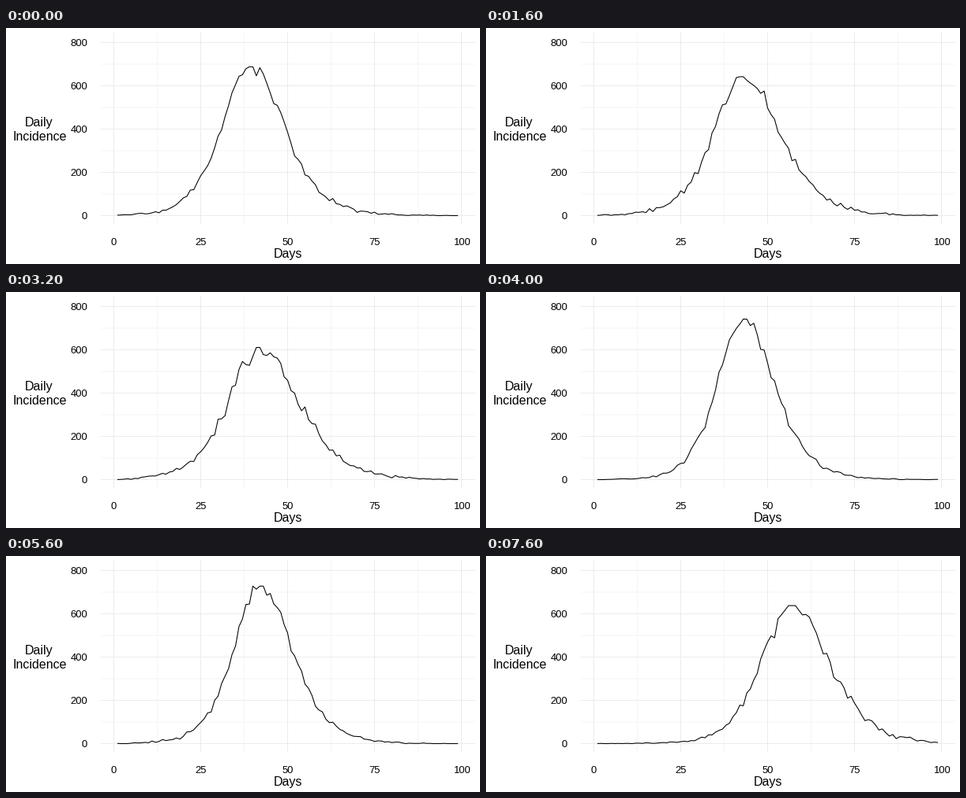
Animation of 600 by 300 pixels, one loop 8000 ms. Source, as a matplotlib script:

```python
import matplotlib.pyplot as plt
import numpy as np
from matplotlib.animation import FuncAnimation

WIDTH, HEIGHT, DPI = 600, 300, 100
PX = 72 / DPI
FONT = "Liberation Sans"
DAYS = np.arange(1, 100)

# Every outbreak infects about the same number of people,
# so a taller peak is also a narrower one.
TOTAL = 16400
RISE_SHARE = 0.45

# Peak day, peak incidence and, where the top is flat, its length in days
OUTBREAKS = [(39, 688), (45, 662), (46, 645), (43, 677), (43, 642),
             (44, 691), (42, 645), (43, 720), (42, 611), (44, 655),
             (43, 742), (41, 806), (40, 645), (42, 651), (42, 728),
             (44, 640), (46, 660, 9), (44, 684), (47, 625), (57, 638)]


def incidence(index):
    """Rise and fall as sech squared, with Poisson-like daily scatter."""
    day, height, *flat = OUTBREAKS[index]
    end = day + sum(flat)
    width = TOTAL / height - sum(flat)
    before = np.maximum(day - DAYS, 0) / (RISE_SHARE * width)
    after = np.maximum(DAYS - end, 0) / ((1 - RISE_SHARE) * width)
    cases = height / np.cosh(before + after) ** 2

    noise = np.random.default_rng(index).normal(scale=0.8, size=DAYS.size)
    cases = np.clip(np.round(cases + noise * np.sqrt(cases)), 0, height)
    cases[day - 1] = height
    return cases


def to_x(day):
    return 136.5 + 4.4 * np.asarray(day)


def to_y(cases):
    return 238.5 - 0.275 * np.asarray(cases)


def grid(days, levels, color):
    style = dict(color=color, lw=PX, zorder=1, snap=False,
                 solid_capstyle="butt")
    for x in to_x(days):
        ax.plot([x, x], [6, 249], **style)
    for y in to_y(levels):
        ax.plot([120, 594], [y, y], **style)


def label(x, y, text, size, ha="center"):
    ax.text(x, y, text, fontsize=size * PX, family=FONT, color="black",
            ha=ha, va="baseline")


fig = plt.figure(figsize=(WIDTH / DPI, HEIGHT / DPI), dpi=DPI, facecolor="white")
ax = fig.add_axes([0, 0, 1, 1])
ax.set_xlim(0, WIDTH)
ax.set_ylim(HEIGHT, 0)
ax.axis("off")

day_ticks = range(0, 101, 25)
case_ticks = range(0, 801, 200)
grid(np.arange(12.5, 100, 25), np.arange(100, 800, 200), "#f4f4f4")
grid(day_ticks, case_ticks, "#ebebeb")

for tick in day_ticks:
    label(to_x(tick), 276, str(tick), 13)
for tick in case_ticks:
    label(103, to_y(tick) + 4.5, str(tick), 13, ha="right")
label(356.5, 292, "Days", 16)
label(42, 125, "Daily", 16)
label(43, 143, "Incidence", 16)

curve, = ax.plot([], [], color="black", lw=1.07 * PX, zorder=2, snap=False,
                 solid_capstyle="butt", solid_joinstyle="round")


def update(index):
    curve.set_data(to_x(DAYS), to_y(incidence(index)))
    return curve,


anim = FuncAnimation(fig, update, frames=len(OUTBREAKS), interval=400,
                     repeat=True, repeat_delay=0)
plt.show()
```
